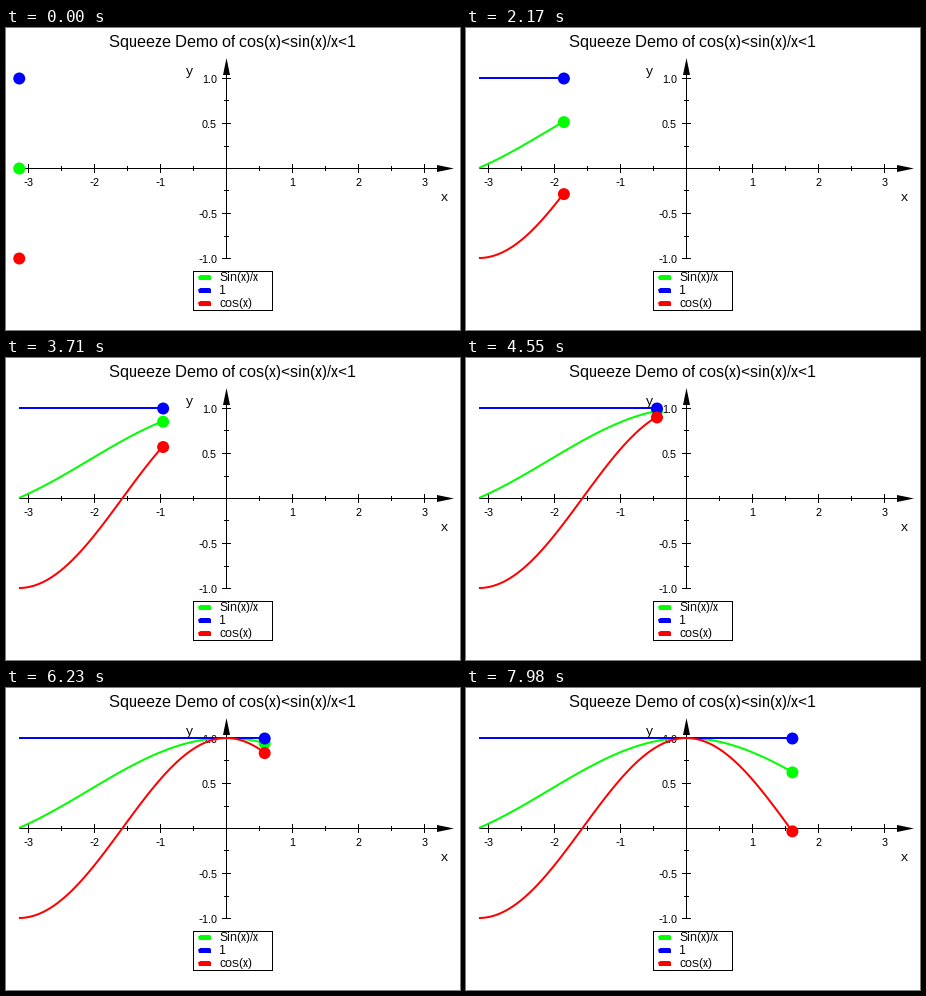
A matplotlib script that plays this animation: 454x302 px, repeating every 8 s.

```python
import numpy as np
import matplotlib.pyplot as plt
from matplotlib.animation import FuncAnimation
from matplotlib.patches import Circle, Polygon, Rectangle

W, H = 454, 302
LOOP, INTERVAL = 8000, 20
X0, Y0, SX, SY = 220, 140, 66, 90

plt.rcParams.update({
    "font.family": "Liberation Sans",
    "text.hinting": "native",
    "text.hinting_factor": 1,
})
fig = plt.figure(figsize=(W / 72, H / 72), dpi=72, facecolor="white")
ax = fig.add_axes([0, 0, 1, 1])
ax.set_xlim(0, W)
ax.set_ylim(H, 0)
ax.axis("off")


def label(x, y, text, size=11, ha="left"):
    ax.text(x, y, text, size=size, ha=ha, va="baseline", zorder=2)


def box(x, y, w, h, color="black"):
    """Fill whole pixels, with the top left pixel at x, y."""
    ax.add_patch(Rectangle((x, y), w, h, fc=color, ec="none", lw=0,
                           antialiased=False, zorder=1))


def shape(points, color):
    ax.add_patch(Polygon(points, closed=True, fc=color, ec="none", lw=0,
                         zorder=2))


# Axes with arrow heads
box(13, Y0, 425, 1)
box(X0, 40, 1, 191)
shape([(448, 140.5), (431, 137), (431, 144)], "black")
shape([(220.5, 30), (217, 47), (224, 47)], "black")

# Ticks and tick labels
for half in range(-6, 7):
    px = X0 + half * SX // 2
    size = 2 if half % 2 else 4
    box(px, Y0 - size, 1, 2 * size + 1)
    if half and half % 2 == 0:
        label(px + .5, 158, str(half // 2), ha="center")
for quarter in range(-4, 5):
    py = Y0 - round(quarter * SY / 4)
    size = 2 if quarter % 2 else 4
    box(X0 - size, py, 2 * size + 1, 1)
    if quarter and quarter % 2 == 0:
        label(211, py + 5, f"{quarter / 4:.1f}", ha="right")

label(226.5, 19, "Squeeze Demo of cos(x)<sin(x)/x<1", 16, "center")
label(435, 173, "x", 13)
label(180, 47, "y", 13)

# Legend frame
box(187, 243, 80, 40)
box(188, 244, 78, 38, "white")

# name, colour, function
curves = [
    ("Sin(x)/x", "#00ff00", lambda x: np.sinc(x / np.pi)),
    ("1", "#0000ff", np.ones_like),
    ("cos(x)", "#ff0000", np.cos),
]

artists = []
for row, (name, color, func) in enumerate(curves):
    top = 247 + 13 * row
    shape([(192, top + 1.5), (194.5, top), (203.5, top), (205, top + 1),
           (205, top + 5), (193, top + 5)], color)
    label(213, top + 6, name, 11.5)
    line, = ax.plot([], [], color=color, lw=2, solid_capstyle="butt",
                    zorder=3 + row)
    dot = ax.add_patch(Circle((0, 0), 6, fc=color, ec="none", lw=0,
                              zorder=6 + row))
    artists.append((line, dot, func))


def step_at(t):
    """Sixteen steps per 3430 ms; the first of each group is held longer."""
    group, rest = divmod(t, 3430)
    return 16 * group + (0 if rest < 280 else 1 + (rest - 280) // 210)


def update(frame):
    n = step_at(frame * INTERVAL + INTERVAL // 2)
    x = np.linspace(-np.pi, -np.pi + n * 2 * np.pi / 49, 121)
    px = X0 + SX * x
    for line, dot, func in artists:
        py = Y0 - SY * func(x)
        line.set_data(px + .25, py)
        line.set_visible(n > 0)
        dot.center = px[-1] + .6, py[-1] + .5
    return [a for line, dot, _ in artists for a in (line, dot)]


anim = FuncAnimation(fig, update, frames=LOOP // INTERVAL, interval=INTERVAL,
                     repeat=True, repeat_delay=0, blit=False)
plt.show()
```
